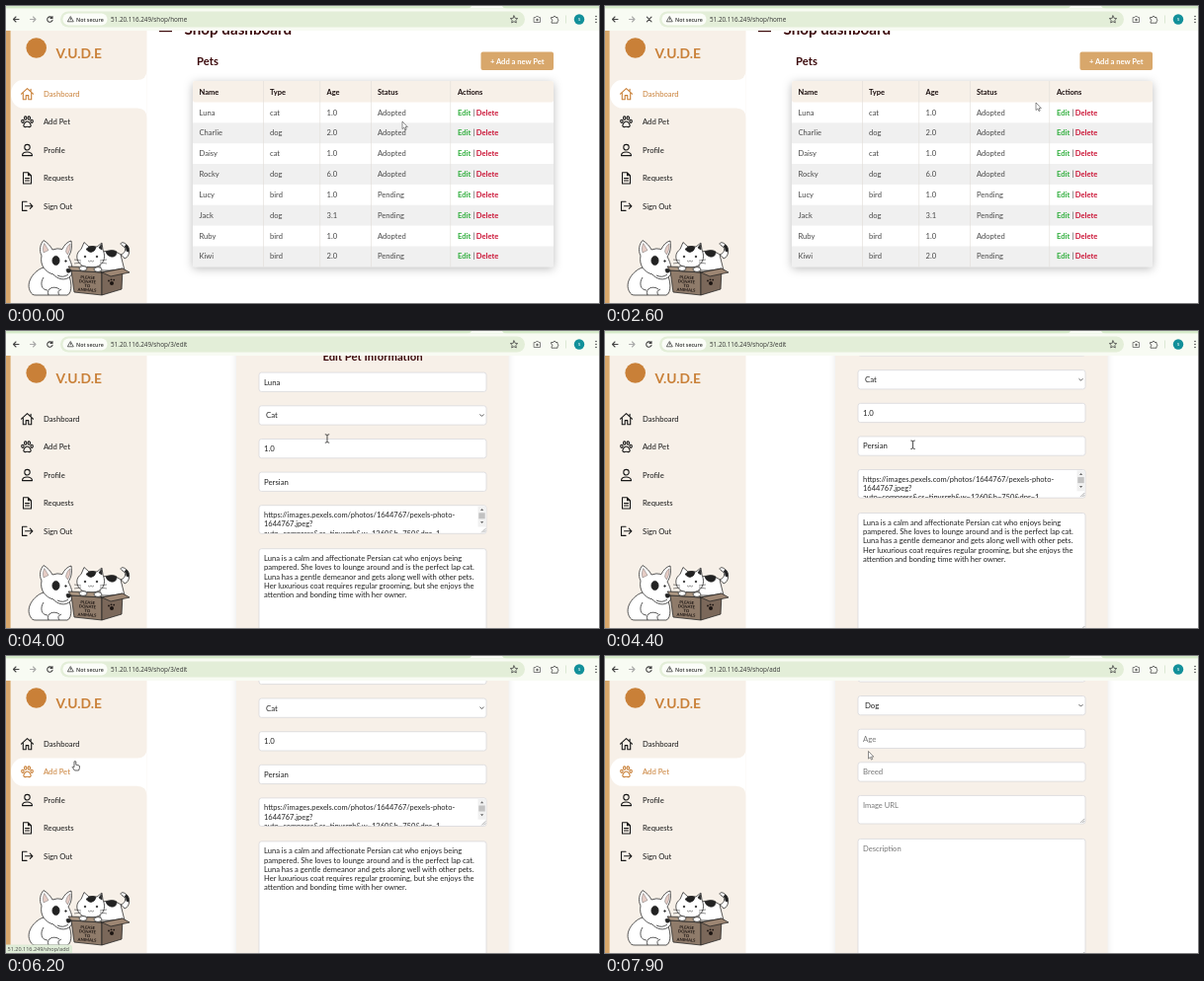
These frames come from a looping animation (600 px wide and 301 px high, 8000 ms). An HTML page:

```html
<!DOCTYPE html>
<html lang="en">
<head>
<meta charset="utf-8">
<title>Shop dashboard</title>
<style>
html, body { margin: 0; width: 100%; height: 100%; overflow: hidden; background: #fff; }
svg { display: block; width: 600px; height: 301px; font-family: Lato, "Open Sans", sans-serif; }
.ui { font-family: "Open Sans", "Noto Sans", sans-serif; }
.line { fill: none; stroke: currentColor; stroke-width: 1.1; stroke-linejoin: round; stroke-linecap: round; }
.thin { stroke-width: .8; }
.card { filter: drop-shadow(0 1px 3px rgba(0, 0, 0, .1)); }
.table { filter: drop-shadow(0 2px 5px rgba(0, 0, 0, .26)); }
</style>
</head>
<body>
<svg id="stage" viewBox="0 0 600 301"></svg>
<script>
const LOOP = 8000, CREAM = '#f7f0e8', TAN = '#d8a76b', MAROON = '#3c0a0c', ORANGE = '#c98038';
const HOST = '51.20.116.249/shop/';

const text = (x, y, s, size = 7.6, fill = '#222', weight = 400, more = '') =>
  `<text x="${x}" y="${y}" font-size="${size}" fill="${fill}" font-weight="${weight}" ${more}>${s.replace(/&/g, '&amp;')}</text>`;
const rect = (x, y, w, h, fill, r = 0, more = '') =>
  `<rect x="${x}" y="${y}" width="${w}" height="${h}" fill="${fill}" rx="${r}" ${more}/>`;
const line = (d, color = 'inherit', thin = '') => `<path class="line ${thin}" d="${d}" color="${color}"/>`;
const shape = (d, fill, more = '') => `<path d="${d}" fill="${fill}" ${more}/>`;
const group = (id, body, more = '') => `<g id="${id}" ${more}>${body}</g>`;
const middle = 'text-anchor="middle"';

// Pages
function dashboard() {
  const cols = [195.5, 267, 324.5, 376, 457], top = 76, head = 21.5, step = 20.85;
  const pets = `Luna cat 1.0 Adopted,Charlie dog 2.0 Adopted,Daisy cat 1.0 Adopted,Rocky dog 6.0 Adopted,
Lucy bird 1.0 Pending,Jack dog 3.1 Pending,Ruby bird 1.0 Adopted,Kiwi bird 2.0 Pending`.split(',');
  let s = rect(155, 24.4, 13, 1.8, MAROON) + text(180.5, 29, 'Shop dashboard', 15.2, MAROON, 700)
    + text(193, 60, 'Pets', 11.3, MAROON, 700)
    + rect(480.5, 46.5, 73.5, 18.5, TAN, 2) + text(517.3, 58.6, '+ Add a new Pet', 7.6, '#fff', 700, middle)
    + rect(189, top, 365, 188.3, '#fff', 2, 'class="table"') + rect(189, top, 365, head, CREAM, 2);
  ['Name', 'Type', 'Age', 'Status', 'Actions'].forEach((h, i) => s += text(cols[i], 89.6, h, 7.5, '#1c1010', 700));
  pets.forEach((pet, r) => {
    const y = top + head + r * step, base = y + 13;
    if (r % 2) s += rect(189, y, 365, step, '#f0f0f0');
    pet.trim().split(' ').forEach((v, i) => s += text(cols[i], base, v, 7.6, '#484848'));
    s += text(457, base, 'Edit', 7.6, '#2fae3c', 700) + text(472.4, base, '|', 7.6, '#444')
      + text(475.8, base, 'Delete', 7.6, '#cb1436', 700);
  });
  [260, 317.5, 369, 449.5].forEach(x => s += rect(x, top, .6, 188.3, '#e2ddd8'));
  return s;
}

function form(title, heading, fields, values) {
  const ink = values ? '#222' : '#777';
  const box = (y, h) => rect(256, y, 230, h, '#fff', 2.5, 'stroke="#d4d4d8" stroke-width=".7"');
  const field = (y, s) => box(y, 19.3) + text(261, y + 12.5, s, 7.8, ink);
  const select = (y, s) => box(y, 19.3) + text(263, y + 12.5, s, 7.8)
    + line(`M479.8 ${y + 8.9}l1.7 1.7 1.7-1.7`, '#333', 'thin');
  const area = (y, h, rows, size, clip = '') => box(y, h)
    + `<g ${clip}>${rows.map((row, i) => text(261, y + 12.5 + i * 9.2, row, size, ink)).join('')}</g>`
    + line(`M481.5 ${y + h - 1.3}l3.5-3.5M483.5 ${y + h - 1.3}l1.5-1.5`, '#999', 'thin');
  let s = text(180.5, 50.4, title, 15.2, MAROON, 700)
    + rect(233, 68, 275.5, 412, CREAM, 5, 'class="card"')
    + text(371, 89.4, heading, 11.25, MAROON, 700, middle)
    + field(101.8, fields[0]) + select(135.5, fields[1]) + field(169.2, fields[2]) + field(202.8, fields[3])
    + area(236.4, 28.6, fields[4], 7.5, 'clip-path="url(#rows)"') + area(280.4, 119.7, fields[5], 7.6)
    + select(416.4, values ? 'Adopted' : 'Available')
    + rect(307.4, 450.3, 127.2, 20.8, TAN, 2) + text(371, 464.3, title, 9.7, '#fff', 400, middle);
  if (values) s += rect(477.5, 237.2, 8, 21, '#f1f1f1') + rect(478.3, 244, 6.4, 6, '#c2c2c2')
    + shape('M480 241.8l1.6-2 1.6 2zM480 252.8l1.6 2 1.6-2z', '#666');
  return s;
}

const editPage = form('Edit Pet', 'Edit Pet Information', ['Luna', 'Cat', '1.0', 'Persian',
  ['https://images.pexels.com/photos/1644767/pexels-photo-', '1644767.jpeg?', 'auto=compress&cs=tinysrgb&w=1260&h=750&dpr=1'],
  ['Luna is a calm and affectionate Persian cat who enjoys being',
    'pampered. She loves to lounge around and is the perfect lap cat.',
    'Luna has a gentle demeanor and gets along well with other pets.',
    'Her luxurious coat requires regular grooming, but she enjoys the',
    'attention and bonding time with her owner.']], true);
const addPage = form('Add Pet', 'Add Pet Information',
  ['Name', 'Dog', 'Age', 'Breed', ['Image URL'], ['Description']], false);

// Sidebar
const ITEM = 28.4, itemY = i => 89.2 + i * ITEM;
const oval = (x, y, rx, ry) => `<ellipse class="line" cx="${x}" cy="${y}" rx="${rx}" ry="${ry}"/>`;
const icons = [
  line('M-6 0L0-5.6 6 0M-4.2-1V5.6H-1.3V1.4H1.3V5.6H4.2V-1M3.6-3V-5'),
  oval(-4.6, -.8, 1.2, 1.6) + oval(-1.8, -4, 1.2, 1.7) + oval(1.8, -4, 1.2, 1.7) + oval(4.6, -.8, 1.2, 1.6)
    + line('M0-.6C2-.6 4 2.5 3.6 4.2 3 5.8 1.4 4.6 0 4.6S-3 5.8-3.6 4.2C-4 2.5-2-.6 0-.6z'),
  oval(0, -2.8, 2.7, 2.8) + line('M-5 5.6C-5 .8 5 .8 5 5.6z'),
  line('M-4-5.6H1L4-2.6V5.6H-4zM1-5.4V-2.6H4M-2 .2H2M-2 2.6H2'),
  line('M-.5-4.6H-5V4.6H-.5M-2 0H5.4M2.8-2.6L5.4 0 2.8 2.6')
];
const labels = ['Dashboard', 'Add Pet', 'Profile', 'Requests', 'Sign Out'];

const dog = shape('M25 290C19 281 28 268 38 265L60 268C68 276 67 292 62 293H30C27 293 26 292 25 290z', '#fff')
  + shape('M36 253C33 247 35 241 38 237.5 42 240 45 243 47 247Q52 245 57 246.5C59 242 62 239 66 238 67 245 66 250 63 254 67 261 69 270 65 274 60 279 52 277 48 272 40 270 34 263 36 253z', '#fff')
  + shape('M38 250C37 246 37.5 243 38.8 240.5L43 247.5zM60.5 249C61 245 63 242 65 241 65.5 246 64 249 62.5 252z', '#e6cdc6', 'stroke-width=".3"')
  + '<ellipse cx="50.5" cy="258" rx="3.6" ry="4.6" fill="#222"/><circle cx="60.5" cy="258.5" r=".8" fill="#222"/>'
  + shape('M61 267q3-2 5 1-1 3-4 2z', '#222')
  + shape('M38 275C34 281 36 288 42 288M43 293C40 286 49 283 54 287M54 293q-3-4 2-6M52 273q6 3 11-1', 'none');
const cat = shape('M95 250C104 246 116 249 120 256 126 254 126 244 121 241 117 238 114 241 118 243 123 246 120 251 116 252L120 268H95z', '#fff')
  + shape('M101 249q7-3 11 0 0 6-6 5-4-1-5-5zM122 242q3 3 2 7l-2-.5q0-3-2-5z', '#222')
  + shape('M72 256C71 251 74 248 76 246.5L79 239.5 84 244Q88 243 92 244L97 240 98 247C102 256 98 265 86 265 77 265 73 261 72 256z', '#fff')
  + shape('M81 246.5L84 244Q88 243 91 244.5 90 249 86 249.5 83 249 81 246.5zM94 245L96.5 241.5 97 247z', '#222')
  + '<circle cx="80" cy="254" r=".8" fill="#222"/><circle cx="92" cy="254" r=".8" fill="#222"/>'
  + shape('M83 258q1.5 2 3 0 1.5 2 3 0M69 257l7 1M69 261l7-1M95 258l7-1M95 260l7 1', 'none', 'stroke-width=".5"');
const carton = shape('M66 268L97 270V293L69 290z', '#8f7b6a') + shape('M97 270L118 266 117 287 97 293z', '#7b685a')
  + shape('M66 268L63 264 92 265 97 270z', '#ab9682') + shape('M97 270L118 266 125 270 106 274z', '#9d8673')
  + '<ellipse cx="78" cy="266" rx="4" ry="2.4" fill="#fff"/><ellipse cx="93" cy="267" rx="4" ry="2.4" fill="#fff"/>';
const paw = [[107, 281, 2], [104, 278.5, .9], [106.5, 277.3, .9], [109.2, 277.6, .9]]
  .map(([x, y, r]) => `<circle cx="${x}" cy="${y}" r="${r}" fill="#1c1512"/>`).join('');
const slogan = ['PLEASE', 'DONATE', 'TO', 'ANIMALS']
  .map((w, i) => text(82.3, 276.6 + i * 4.2, w, 4.2, '#1c1512', 700, middle)).join('');
const animals = `<g stroke="#222" stroke-width=".75" stroke-linejoin="round">${dog + cat + carton}</g>`
  + `<g transform="rotate(3 82 282)">${slogan}</g>` + paw;

const sidebar = rect(0, 25, 142.5, 276, CREAM) + rect(0, 25, 4.6, 276, TAN)
  + group('active', shape('M17 0H132.5Q142.5 0 142.5-10V38.4Q142.5 28.4 132.5 28.4H17C10 28.4 5 22 5 14.2S10 0 17 0z', '#fff'))
  + `<circle cx="30.7" cy="42.5" r="10.3" fill="${ORANGE}"/>` + text(50.5, 52.6, 'V.U.D.E', 13.8, ORANGE, 700)
  + labels.map((s, i) => `<g class="item"><g class="icon" transform="translate(21.5 ${itemY(i)})">${icons[i]}</g>`
    + text(38, itemY(i) + 2.7, s, 7.7, 'currentColor') + '</g>').join('')
  + animals
  + group('artCover', rect(6, 33.5, 42, 22, CREAM) + rect(6, 245, 130, 56, CREAM));

// Browser bar
const browser = rect(0, 0, 600, 25, '#f8fbf3') + rect(0, 0, 600, 2.4, '#d5eac9')
  + shape('M466 2.5Q470 2.5 471 0H502Q503 2.5 507 2.5z', '#f8fbf3')
  + rect(55, 5.5, 470, 16, '#e3eed8', 8) + rect(57.5, 7.5, 45, 12, '#fbfdf8', 6)
  + line('M13 13.5H7.5M10 11L7.5 13.5 10 16', '#444') + line('M24.5 13.5H30M27.5 11L30 13.5 27.5 16', '#aaa')
  + group('reload', line('M46.6 12A2.7 2.7 0 1 0 47 14.4M47 10.6V12.4H45', '#444'))
  + group('stop', line('M42.4 11.2L47 15.8M47 11.2L42.4 15.8', '#444'))
  + line('M65.5 10.9L68.3 15.8H62.7zM65.5 12.6V13.8', '#444', 'thin')
  + `<g class="ui">${text(71, 15.5, 'Not secure', 5.3, '#333', 600)}${text(106, 15.7, '', 6.3, '#333', 400, 'id="url"')}`
  + `<circle cx="580" cy="13.5" r="5.2" fill="#12909a"/>${text(580, 15.4, 's', 5.5, '#fff', 400, middle)}</g>`
  + line('M514 9.9l1.1 2.4 2.6.3-1.9 1.8.5 2.6-2.3-1.3-2.3 1.3.5-2.6-1.9-1.8 2.6-.3z', '#444', 'thin')
  + line('M534.5 11.5h1.5l.6-1h1.8l.6 1h1.5v5h-6z', '#666', 'thin') + '<circle cx="537.5" cy="14" r="1.2" fill="#666"/>'
  + line('M552 11.5h1.8a1.2 1.2 0 0 1 2.4 0h1.8v1.8a1.2 1.2 0 0 1 0 2.3v1.6h-6v-1.6a1.2 1.2 0 0 0 0-2.3z', '#444', 'thin')
  + rect(566, 9.5, .7, 8, '#cfe0c6')
  + [10.5, 13.5, 16.5].map(y => `<circle cx="597" cy="${y}" r=".8" fill="#444"/>`).join('');

const cursors = group('arrow', shape('M0 0V7.6L1.8 6 3 8.6 4.2 8 3 5.6H5.3z', '#fff', 'stroke="#333" stroke-width=".55"'))
  + group('hand', shape('M-1 0Q0-1 .8 0V3.2L4 4Q4.8 4.4 4.4 6.5L3.6 9H-.6L-2.8 5.6Q-2.6 4.4-1 5.6z', '#fff', 'stroke="#222" stroke-width=".7"'))
  + group('ibeam', line('M-1.8-4.2Q0-4.2 0-3.4 0-4.2 1.8-4.2M0-3.4V3.4M-1.8 4.2Q0 4.2 0 3.4 0 4.2 1.8 4.2', '#222', 'thin'));

document.getElementById('stage').innerHTML =
  '<clipPath id="rows"><rect x="257" y="237" width="220" height="27.8"/></clipPath>'
  + rect(0, 0, 600, 301, '#fff') + group('home', dashboard()) + group('edit', editPage) + group('add', addPage)
  + sidebar + browser
  + group('status', shape('M0 292.5H68Q71 292.5 71 295.5V301H0z', '#dfecd7', 'id="bubble"') + text(1.5, 298.8, '', 5.5, '#444', 400, 'id="link"'), 'class="ui"')
  + group('cursor', cursors);

// Timeline
const pointer = [[0, 401, 117], [500, 463, 107], [900, 463, 107], [1700, 429.5, 95], [2600, 436, 98], [3250, 473, 111],
  [3700, 473, 111], [4000, 325, 109], [4500, 310, 116], [5250, 174, 135], [5650, 174, 135], [6150, 70, 107],
  [6750, 70, 107], [7400, 230, 92], [7850, 266.5, 96.5]];
const editScroll = [[3700, 0], [4000, 59.7], [4500, 100], [5100, 184.4], [5350, 184.4], [5500, 168], [6050, 92.5]];
const addScroll = [[7250, 0], [7650, 95]];
const pointerKind = [[0, 'arrow'], [420, 'hand'], [980, 'arrow'], [3100, 'ibeam'], [4780, 'arrow'], [5950, 'hand'], [6980, 'arrow']];
const EDIT_AT = 3000, ADD_AT = 6800;

function at(keys, t, k = 1) {
  const i = keys.findIndex(key => key[0] > t);
  if (i < 0) return keys[keys.length - 1][k];
  if (!i) return keys[0][k];
  const a = keys[i - 1], b = keys[i], p = (t - a[0]) / (b[0] - a[0]);
  return a[k] + (b[k] - a[k]) * p * p * (3 - 2 * p);
}
const el = id => document.getElementById(id);
const show = (node, on) => node.style.display = on ? '' : 'none';
const move = (id, x, y) => el(id).setAttribute('transform', `translate(${x} ${y})`);
const within = (t, a, b) => t >= a && t < b;
const items = [...document.querySelectorAll('.item')];

function draw(t) {
  const page = t < EDIT_AT ? 'home' : t < ADD_AT ? 'edit' : 'add';
  ['home', 'edit', 'add'].forEach(id => show(el(id), id === page));
  move('edit', 0, -at(editScroll, t));
  move('add', 0, -at(addScroll, t));

  const active = page === 'home' ? 0 : t >= 5950 ? 1 : -1;
  show(el('active'), active >= 0);
  move('active', 0, itemY(active) - ITEM / 2);
  items.forEach((item, i) => {
    item.setAttribute('color', i === active ? ORANGE : '#181818');
    show(item.querySelector('.icon'), i < 3 || !(within(t, EDIT_AT, 3450) || within(t, ADD_AT, 7000)));
  });
  show(el('artCover'), within(t, EDIT_AT, 3750) || within(t, ADD_AT, 7320));

  const loading = within(t, 750, 3750) || within(t, 6450, 7150);
  show(el('stop'), loading);
  show(el('reload'), !loading);
  el('url').textContent = HOST + { home: 'home', edit: '3/edit', add: 'add' }[page];
  show(el('status'), within(t, 450, 2400) || within(t, 5980, 7050));
  el('link').textContent = HOST + (t < EDIT_AT ? '3/edit' : 'add');
  move('bubble', t < EDIT_AT ? 0 : -4, 0);

  const kind = pointerKind.filter(k => k[0] <= t).pop()[1];
  ['arrow', 'hand', 'ibeam'].forEach(id => show(el(id), id === kind));
  move('cursor', at(pointer, t), at(pointer, t, 2));
}

const start = performance.now();
function tick() {
  draw((performance.now() - start) % LOOP);
  requestAnimationFrame(tick);
}
tick();
</script>
</body>
</html>
```
